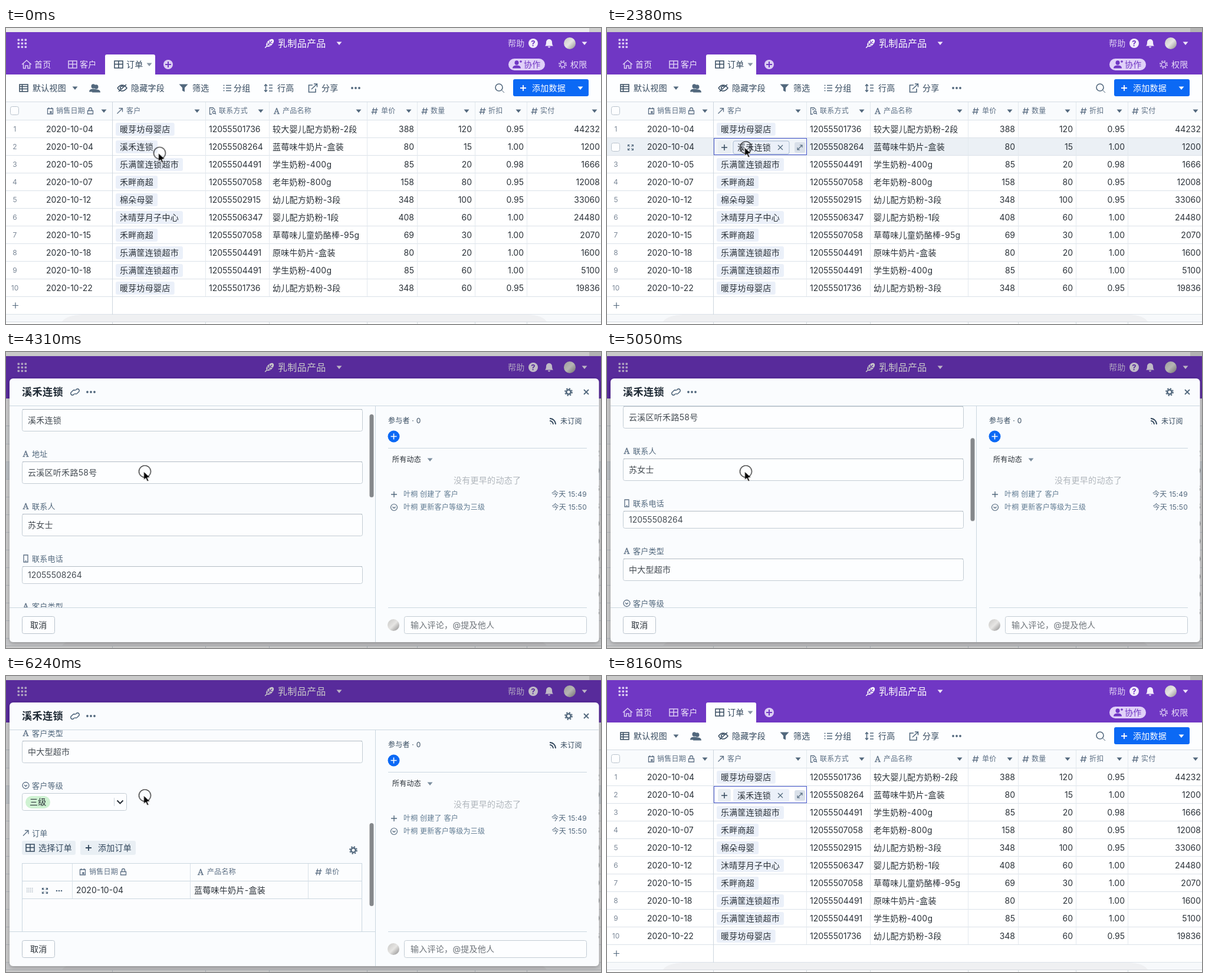
An HTML page for the animation above (8.45 s loop, 1009x503 px).

```html
<!DOCTYPE html>
<html lang="zh-CN">
<head>
<meta charset="utf-8">
<title>订单</title>
<style>
html, body { margin: 0; width: 100%; height: 100%; overflow: hidden; background: #fff; }
svg { display: block; width: 100%; height: 100%; }
text { font-family: Inter, "Noto Sans CJK SC", "Noto Sans CJK", sans-serif; white-space: pre; }
.cjk { letter-spacing: .02em; }
.serif { font-family: "Noto Serif", serif; }
#modal { transform-origin: 505.5px 269px; }
</style>
</head>
<body>
<svg id="stage" viewBox="0 0 1009 503" xmlns="http://www.w3.org/2000/svg"></svg>
<script>
const LOOP = 8450;
const PURPLE = '#7037c4', LILAC = '#dccdf3', BLUE = '#0b69f5', INK = '#2a3138',
      TOOL = '#34495e', HEAD = '#5c6f84', SLATE = '#52687d', LINE = '#dbe2e9', RULE = '#cbd7e0';

// ---- drawing helpers
const rect = (x, y, w, h, fill, extra = '') =>
  `<rect x="${x}" y="${y}" width="${w}" height="${h}" fill="${fill}" ${extra}/>`;
const box = (x, y, w, h, stroke, r = 3, fill = '#fdfeff') =>
  rect(x + .5, y + .5, w - 1, h - 1, fill, `rx="${r}" stroke="${stroke}"`);
const line = (x1, y1, x2, y2, color = LINE) =>
  `<path d="M${x1} ${y1}L${x2} ${y2}" stroke="${color}"/>`;
const circle = (x, y, r, fill, extra = '') =>
  `<circle cx="${x}" cy="${y}" r="${r}" fill="${fill}" ${extra}/>`;
const text = (x, y, s, size = 14, fill = INK, extra = '') =>
  `<text x="${x}" y="${y + size * .36}" font-size="${size}" fill="${fill}" ${/[\u4e00-\u9fff]/.test(s) ? 'class="cjk"' : ''} ${extra}>${s}</text>`;
const right = (x, y, s, size, fill) => text(x, y, s, size, fill, 'text-anchor="end"');
const group = (id, body, extra = '') => `<g id="${id}" ${extra}>${body}</g>`;
const at = (x, y, body) => `<g transform="translate(${x} ${y})">${body}</g>`;

const SHAPES = {
  table: 'M-7-6H7V6H-7zM-7-.5H7M0-6V6',
  view: 'M-7-6H7V6H-7zM-7-2.5H7M-7 1.5H7M-2.5-6V6',
  plus: 'M-5 0H5M0-5V5',
  cross: 'M-4-4L4 4M4-4L-4 4',
  date: 'M-4.5-4h9V5h-9zM-2.5-6v3M2.5-6v3M0 1h2v2h-2z',
  lock: 'M-4.5-.5h9v5.5h-9zM-2.5-.5v-2.5a2.5 2.5 0 0 1 5 0v2.5',
  link: 'M-4.5 4.5L4.5-4.5M-1.5-4.5h6v6',
  lookup: 'M-1 5.5H-4.5V-5.5H1L4-2.5V-1.5M-2-2.5H1M4.6 4L6 5.5M.5 2.2a2.2 2.2 0 1 0 4.4 0a2.2 2.2 0 1 0-4.4 0',
  hash: 'M-4-2H5.5M-5.5 2H4M-1.5-5.5l-2 11M3.5-5.5l-2 11',
  pick: 'M-5.5 0a5.5 5.5 0 1 0 11 0a5.5 5.5 0 1 0-11 0M-2.5-1L0 1.5L2.5-1',
  phone: 'M-3.5-6h7v12h-7zM-1 4h2',
  full: 'M-4.5-1.5v-3h3M1.5-4.5h3v3M4.5 1.5v3h-3M-1.5 4.5h-3v-3M-4-4l2.5 2.5M4-4L1.5-1.5M4 4L1.5 1.5M-4 4l2.5-2.5',
  diag: 'M-3.5 3.5l7-7M0-4h4v4M0 4h-4v-4',
  home: 'M-8 0L0-7L8 0M-5.5-2V6.5H-2V2H2V6.5H5.5V-2',
  eye: 'M-8 0Q0-10 8 0Q0 10-8 0M-2 2.5a3 3 0 0 1 4-5M-6 6L7-6',
  list: 'M-6.5-4.5h2M-6.5 0h2M-6.5 4.5h2M-2-4.5H7M-2 0H7M-2 4.5H7',
  height: 'M-4.5-6V6M-7-3.5L-4.5-6L-2-3.5M-7 3.5L-4.5 6L-2 3.5M1-5H7M1 0H7M1 5H7',
  share: 'M0-5H-6.5V7H5V1M-2 2L7-6.5M2-7H7.5V-1.5',
  chain: 'M-1 3l-2 2a3 3 0 0 1-4-4l3.5-3.5a3 3 0 0 1 4 0M1-3l2-2a3 3 0 0 1 4 4L3.500 2.500a3 3 0 0 1-4 0',
  feed: 'M-5-5a10 10 0 0 1 10 10M-5-1a6 6 0 0 1 6 6M-4 4h.5',
  chevron: 'M-5-2.500L0 2.500L5-2.500'
};
const icon = (name, x, y, color = HEAD, w = 1.3) =>
  `<path transform="translate(${x} ${y})" d="${SHAPES[name]}" fill="none" stroke="${color}" stroke-width="${w}"/>`;
const solid = (x, y, d, color) => `<path transform="translate(${x} ${y})" d="${d}" fill="${color}"/>`;
const caret = (x, y, color = SLATE) => solid(x, y, 'M-4.500-2.500h9l-4.500 5.500z', color);
const dots = (x, y, color = SLATE) => [-6, 0, 6].map(d => circle(x + d, y, 1.9, color)).join('');
const gear = (x, y, color = SLATE, w = 2.6) =>
  circle(x, y, 3.800, 'none', `stroke="${color}" stroke-width="${w}"`) +
  circle(x, y, 6, 'none', `stroke="${color}" stroke-width="1.800" stroke-dasharray="2.400 2.312"`);
const person = (x, y, color) =>
  solid(x, y, 'M-3.500-3a3.500 3.800 0 1 1 7 0a3.500 3.800 0 0 1-7 0M-7 6.500Q-7 2-1.500 1.500H1.500Q7 2 7 6.500z', color);
const letterA = (x, y) =>
  `<text class="serif" x="${x}" y="${y + 5}" font-size="14" text-anchor="middle" fill="${HEAD}" stroke="${HEAD}" stroke-width=".3">A</text>`;
const mark = (type, x, y) => type === 'A' ? letterA(x, y) : icon(type, x, y);
const avatar = (x, y) => circle(x, y, 10, 'url(#photo)');

// ---- timing helpers: every track is a stepped keyframe rule
const rules = [];
const track = (id, steps) => {
  const frames = steps.map(([t, css]) => `${(t / LOOP * 100).toFixed(3)}%{${css}}`).join('');
  rules.push(`@keyframes ${id}{${frames}}#${id}{animation:${id} ${LOOP}ms step-end infinite}`);
};
const show = (id, ...times) =>
  track(id, [0, ...times].map((t, i) => [t, `opacity:${i % 2}`]));
const move = (x, y) => `transform:translate(${x}px,${y}px)`;

// ---- data
const SHOP = '溪禾连锁', PHONE = '12055508264';
const baby = '暖芽坊母婴店', market = '乐满筐连锁超市', store = '禾畔商超';
const rows = [
  ['2020-10-04', baby, '12055501736', '较大婴儿配方奶粉-2段', 388, 120, '0.95', 44232],
  ['2020-10-04', SHOP, PHONE, '蓝莓味牛奶片-盒装', 80, 15, '1.00', 1200],
  ['2020-10-05', market, '12055504491', '学生奶粉-400g', 85, 20, '0.98', 1666],
  ['2020-10-07', store, '12055507058', '老年奶粉-800g', 158, 80, '0.95', 12008],
  ['2020-10-12', '棉朵母婴', '12055502915', '幼儿配方奶粉-3段', 348, 100, '0.95', 33060],
  ['2020-10-12', '沐晴芽月子中心', '12055506347', '婴儿配方奶粉-1段', 408, 60, '1.00', 24480],
  ['2020-10-15', store, '12055507058', '草莓味儿童奶酪棒-95g', 69, 30, '1.00', 2070],
  ['2020-10-18', market, '12055504491', '原味牛奶片-盒装', 80, 20, '1.00', 1600],
  ['2020-10-18', market, '12055504491', '学生奶粉-400g', 85, 60, '1.00', 5100],
  ['2020-10-22', baby, '12055501736', '幼儿配方奶粉-3段', 348, 60, '0.95', 19836]
];
const columns = [
  ['date', 75, 85, '销售日期', 166], ['link', 193, 204, '客户', 324],
  ['lookup', 350, 361, '联系方式', 432], ['A', 459, 469, '产品名称', 598],
  ['hash', 625, 636, '单价', 683], ['hash', 710, 720, '数量', 781],
  ['hash', 808, 818, '折扣', 869], ['hash', 896, 906, '实付', 998]
];
const edges = [180.5, 338.5, 446.5, 612.5, 697.5, 795.5, 883.5];

// ---- page
function banner() {
  let s = rect(0, 0, 1009, 7, '#c9c9c9', 'id="strip"') + rect(989, 0, 20, 7, '#b2b2b2', 'id="corner"') +
    rect(0, 7, 1009, 72, PURPLE);
  for (let i = 0; i < 9; i++) s += rect(19.500 + i % 3 * 6, 18.500 + (i / 3 | 0) * 6, 3.600, 3.600, LILAC, 'rx="1"');
  s += `<g transform="translate(447 26) rotate(45)"><ellipse rx="4.500" ry="8" cy="-1" fill="#fff"/><path d="M0-6V11M-3.500-3L0 0L3.500-3M-3.500 1L0 4L3.500 1" fill="none" stroke="${PURPLE}" stroke-width="1.100"/><path d="M0 6V11" stroke="#fff" stroke-width="1.500"/></g>`;
  s += text(461, 26, '乳制品产品', 16, '#fff') + caret(565, 26, '#efe6fa') + text(851, 26, '帮助', 14, LILAC) +
    circle(894, 26, 8, '#f3ecfb') + text(894, 26, '?', 13, PURPLE, 'text-anchor="middle" font-weight="700"') +
    solid(921, 26, 'M-7 4.500Q-5 3-5-2a5 5 0 0 1 10 0Q5 3 7 4.500zM-2 5.500h4a2 2 0 0 1-4 0', '#f3ecfb') +
    avatar(956, 26) + caret(981, 26, '#efe6fa');
  s += icon('home', 35, 62, LILAC, 1.500) + text(48, 62, '首页', 14, '#eee5fa') +
    icon('table', 113, 62, LILAC, 1.500) + text(125, 62, '客户', 14, '#eee5fa') +
    '<path d="M168 79V48q0-3 3-3h79q3 0 3 3v31z" fill="#fdfeff"/>' +
    icon('table', 191, 62, TOOL, 1.500) + text(204, 62, '订单', 14, TOOL) + caret(243, 62, '#8a97a5') +
    circle(275, 62, 8, LILAC) + icon('plus', 275, 62, PURPLE, 2);
  s += rect(852, 52, 62, 20, '#e0d0f8', 'rx="10"') + person(866, 62, PURPLE) +
    at(873, 57, `<path d="M-2 0H2M0-2V2" stroke="${PURPLE}" stroke-width="1.300"/>`) +
    text(878, 62, '协作', 14, PURPLE) + gear(944, 62, LILAC, 1.400) + text(957, 62, '权限', 14, '#e9dff8');
  return s;
}

function toolbar() {
  const labels = [[45, '默认视图'], [212, '隐藏字段'], [316, '筛选'], [386, '分组'], [460, '行高'], [535, '分享']];
  return rect(0, 79, 1009, 46, '#fdfeff') + labels.map(([x, s]) => text(x, 102, s, 14, TOOL)).join('') +
    icon('view', 30, 102, TOOL, 1.500) + caret(117, 102) + person(148, 102, SLATE) + person(153, 103, SLATE) +
    icon('eye', 197, 102, TOOL, 1.500) + solid(301, 102, 'M-7.500-6.500h15L2-.5V6.500L-2 4.500V-.5z', SLATE) +
    icon('list', 375, 102, SLATE, 1.700) + icon('height', 445, 102, SLATE, 1.600) +
    icon('share', 520, 102, SLATE, 1.600) + dots(593, 102) +
    circle(836, 101, 6, 'none', `stroke="${SLATE}" stroke-width="1.600"`) + line(840.5, 105.5, 845, 110, SLATE) +
    rect(860, 87, 128, 29, BLUE, 'rx="3"') + icon('plus', 877, 102, '#fff', 1.800) +
    text(892, 102, '添加数据', 14, '#fff') + caret(974, 102, '#fff');
}

const chip = (x, y, s, w, extra = '') => rect(x, y - 11, w, 22, '#ebf0f9', `rx="3" ${extra}`) + text(x + 7, y, s);

function sheet() {
  let s = rect(0, 125, 1009, 32, '#f9fbfd') + rect(0, 157, 1009, 330, '#fff') + line(0, 125.5, 1009, 125.5, '#d3dbe3');
  s += group('hover', rect(0, 187, 1009, 29, '#ebf0f5') + box(7, 195, 15, 15, '#b9c3cd') + icon('full', 40, 203, SLATE, 1.100));
  for (let y = 156.5; y < 490; y += 30) s += line(0, y, 1009, y);
  s += edges.map((x, i) => line(x, 126, x, i ? 456 : 487, i ? '#e3e9ee' : '#cdd6de')).join('');
  s += box(7, 133, 15, 15, '#b9c3cd');
  for (const [type, ix, tx, name, cx] of columns)
    s += mark(type, ix, 141) + text(tx, 141, name, 12, HEAD) + caret(cx, 141);
  s += icon('lock', 143, 141);
  rows.forEach(([date, shop, tel, item, price, count, off, paid], i) => {
    const y = 172 + i * 30, open = i === 1;
    s += text(15, y, String(i + 1), 12, '#7a8797', `text-anchor="middle" ${open ? 'id="index"' : ''}`);
    s += text(68, y, date) + chip(186, y, shop, shop.length * 14.28 + 14, open ? 'id="chip"' : '') +
      text(344, y, tel) + text(452, y, item) +
      right(692, y, price) + right(790, y, count) + right(878, y, off) + right(1007, y, paid);
  });
  s += icon('plus', 16, 471.5, SLATE, 1.200);
  s += group('cell', rect(181.5, 187.5, 157, 28, '#fff', 'id="cellBox" stroke="#4757cb"') +
    rect(188, 192, 22, 22, '#e9eef3', 'rx="3"') + icon('plus', 199, 203, TOOL, 1.500) +
    chip(214, 203, SHOP, 95, 'id="tag"') + icon('cross', 294, 203, SLATE, 1.200) +
    rect(318, 194, 18, 18, '#d9e0e9', 'rx="3"') + icon('diag', 327, 203, SLATE, 1.100));
  s += rect(0, 487, 1009, 16, '#f7f9fb') +
    '<path d="M95 499Q102 488 130 487H885Q910 488 917 499z" fill="#eff0f2"/>' +
    rect(0, 500, 1009, 3, '#fff') + line(0, 499.5, 1009, 499.5, '#d3d8dd') +
    edges.map(x => line(x, 500, x, 503, '#d3dae0')).join('');
  return s;
}

// ---- record window
const label = (type, y, s) => mark(type, 33.5, y) + text(44, y, s, 13, SLATE);
const field = (y, h, s) => box(27, y, 578, h, '#c3ccd4') + line(28, y + .5, 604, y + .5, '#b3bcc4') + text(37, y + h / 2, s, 14, '#454c53');

function form() {
  let s = label('A', 114, '客户名称') + icon('lock', 106.5, 114) + field(127, 38, SHOP) +
    label('A', 203, '地址') + field(216, 38, '云溪区听禾路58号') +
    label('A', 292, '联系人') + field(305, 38, '苏女士') +
    label('phone', 381, '联系电话') + field(394, 30, PHONE) +
    label('A', 462, '客户类型') + field(475, 38, '中大型超市') +
    label('pick', 551, '客户等级') + box(27, 564, 178, 30, '#c3ccd4') +
    rect(33, 569, 42, 21, '#cff2d2', 'rx="10.500"') + text(40, 579, '三级') +
    line(183.5, 572, 183.5, 586, '#ccd4db') + icon('chevron', 193.5, 579, INK, 2) +
    label('link', 632, '订单');
  s += rect(27, 645, 91, 24, '#e9eff4', 'rx="3"') + icon('table', 41, 657, TOOL, 1.500) + text(55, 657, '选择订单', 14, TOOL) +
    rect(126, 645, 94, 24, '#e9eff4', 'rx="3"') + icon('plus', 140, 657, TOOL, 1.800) + text(156, 657, '添加订单', 14, TOOL) +
    gear(589, 661);
  s += rect(27.5, 683.5, 576, 200, '#fcfdfe', `stroke="${RULE}"`) + line(27, 713.5, 604, 713.5, RULE) + line(27, 743.5, 604, 743.5, RULE) +
    [113, 313, 513].map(x => line(x - .5, 684, x - .5, 743, '#d9e2e9')).join('') +
    icon('date', 130, 698) + text(141, 698, '销售日期', 12, HEAD) + icon('lock', 199, 698) +
    letterA(330, 698) + text(341, 698, '产品名称', 12, HEAD) + icon('hash', 530, 698) + text(541, 698, '单价', 12, HEAD);
  for (let i = 0; i < 12; i++) s += rect(35 + i % 4 * 3, 725 + (i / 4 | 0) * 3, 1.500, 1.500, '#a9b5c0');
  s += icon('full', 66, 730, SLATE, 1.200) + at(90, 730, [-4, 0, 4].map(x => circle(x, 0, 1.3, SLATE)).join('')) +
    text(119, 729, '2020-10-04') + text(319, 729, '蓝莓味牛奶片-盒装');
  return s;
}

function panel() {
  const pale = '#5f7a91';
  return text(648, 117, '参与者 · 0', 12, TOOL) + icon('feed', 927, 118, TOOL, 1.800) + text(940, 118, '未订阅', 12, TOOL) +
    circle(657.5, 143.5, 10, BLUE) + icon('plus', 657.5, 143.5, '#fff', 1.600) + line(648, 163.5, 985, 163.5, RULE) +
    text(655, 183, '所有动态', 12, INK) + caret(719, 183, '#7d8fa0') +
    group('spinner', circle(816, 333.5, 9, 'none', 'stroke="#e3e6e9" stroke-width="2.500"') +
      '<path d="M825 333.500a9 9 0 0 1-9 9" fill="none" stroke="#b9bec4" stroke-width="2.500"/>') +
    group('news', text(759, 218, '没有更早的动态了', 14, '#b0b6bc') +
      icon('plus', 658, 242, SLATE, 1.400) + text(674, 242, '叶桐 创建了 客户', 12, pale) + right(985, 242, '今天 15:49', 12, SLATE) +
      icon('pick', 658, 264, SLATE, 1.200) + text(674, 264, '叶桐 更新客户等级为三级', 12, pale) + right(985, 264, '今天 15:50', 12, SLATE)) +
    line(648, 434.5, 985, 434.5, RULE) + avatar(657, 464) + box(675, 449, 310, 30, '#c3ccd4') +
    text(686, 464, '输入评论，@提及他人', 14, '#6c7278');
}

function modal() {
  return rect(6, 45, 999.5, 448, '#fafcfe', 'rx="6" filter="url(#shade)"') +
    text(27, 68, SHOP, 17.2, '#1f2a35', 'font-weight="600"') + icon('chain', 117, 68, SLATE, 1.600) + dots(144, 68) +
    gear(954, 68) + rect(969, 54, 31, 29, '#e9edf1', 'id="closeHover" rx="3"') + icon('cross', 984, 68, SLATE, 1.800) +
    `<g clip-path="url(#view)">${group('form', form())}${rect(616.5, 93, 7, 141, '#85888b', 'id="thumb" rx="3.500"')}</g>` +
    line(6, 91.5, 1005, 91.5, RULE) + line(626.5, 92, 626.5, 493, RULE) + line(6, 434.5, 626, 434.5, RULE) +
    box(27, 449, 56, 30, '#b9c3cc') + text(41, 464, '取消') + panel();
}

const pointer = group('pointer',
  group('arrow', '<path d="M-2 0V14.500L1.500 11.300L4 17L6.500 16L4.200 10.400H9z" fill="#000" stroke="#fff" stroke-width="1"/>') +
  group('hand', '<path d="M-2 2.500q1.500-2.500 3 0V8q1-1 2.300 0q1.300-.8 2.300.3q2-.5 2 1.700V14L6 19H-1L-5.500 12.500q0-2 2-1L-2 13z" fill="#fff" stroke="#000" stroke-width="1.100"/><path d="M1 13v3M3.500 13v3" stroke="#000" stroke-width=".8"/>') +
  circle(0, 0, 10, 'none', 'stroke="#111" stroke-width="1.200"'));

document.getElementById('stage').innerHTML =
  `<defs><linearGradient id="photo" x1="0" y1="0" x2="1" y2="1"><stop offset="0" stop-color="#c9c8c6"/><stop offset=".5" stop-color="#e6e5e3"/><stop offset="1" stop-color="#8d8c8b"/></linearGradient>
  <filter id="shade" x="-5%" y="-5%" width="110%" height="112%"><feDropShadow dx="0" dy="2" stdDeviation="3" flood-opacity=".25"/></filter>
  <clipPath id="view"><rect x="6" y="92" width="620" height="342"/></clipPath></defs>` +
  banner() + toolbar() + sheet() + rect(0, 7, 1009, 496, '#000', 'id="dim"') + group('modal', modal()) + pointer;

// ---- timeline
track('strip', [[0, 'fill:#ececec'], [740, 'fill:#c9c9c9']]);
track('corner', [[0, 'fill:#cdcdcd'], [740, 'fill:#b2b2b2']]);
show('hover', 740, 7570);
track('index', [[0, 'opacity:1'], [740, 'opacity:0'], [7570, 'opacity:1']]);
show('cell', 2380, 3570, 7570);
track('cellBox', [[0, 'fill:#f0f4f8'], [7570, 'fill:#fff']]);
track('tag', [[0, 'stroke:#a9bbd0'], [7570, 'stroke:none']]);
track('chip', [[0, 'stroke:none'], [3570, 'stroke:#a9bbd0'], [7570, 'stroke:none']]);
track('dim', [[0, 'opacity:0'], [3570, 'opacity:.21'], [7570, 'opacity:0']]);
track('modal', [
  [0, 'opacity:0;transform:scale(.962)'], [3570, 'opacity:.94;transform:scale(.962)'],
  [3720, 'opacity:1;transform:scale(1)'], [7570, 'opacity:.5;transform:scale(1)'],
  [7720, 'opacity:0;transform:scale(1)']
]);
show('spinner', 3570, 3870);
show('news', 3870);

const scroll = [
  [0, 0], [4310, 30], [4460, 76], [4610, 98], [5050, 124], [5200, 168], [5350, 188],
  [5790, 214], [5940, 300], [6090, 350], [6240, 365], [7720, 0]
];
track('form', scroll.map(([t, s]) => [t, move(0, -s)]));
track('thumb', scroll.map(([t, s]) =>
  [t, `${move(0, s * .43)};opacity:${t ? 1 : 0}`]).filter(([t]) => t < 6540).concat([[6540, 'opacity:0']]));

// pointer glides from the cell to the close button, then leaves on the right
const glide = [6540, 6690, 6840, 6980, 7130, 7280, 7420].map((t, i) => {
  const u = (i + 1) / 7, p = u * u * (3 - 2 * u);
  return [t, move(235.5 + 754 * p, 203 - 133 * p)];
});
track('pointer', [
  [0, move(260.5, 212.5)], [1480, move(243, 206)], [1630, move(235.5, 203)], ...glide,
  [7720, move(992, 73)], [7870, move(999, 80)], [8010, move(1007, 88)], [8160, move(1040, 96)]
]);
show('hand', 7280, 7720);
track('arrow', [[0, 'opacity:1'], [7280, 'opacity:0'], [7720, 'opacity:1']]);
show('closeHover', 7420, 7720);

const sheetCss = document.createElement('style');
sheetCss.textContent = rules.join('\n');
document.head.append(sheetCss);
</script>
</body>
</html>
```
